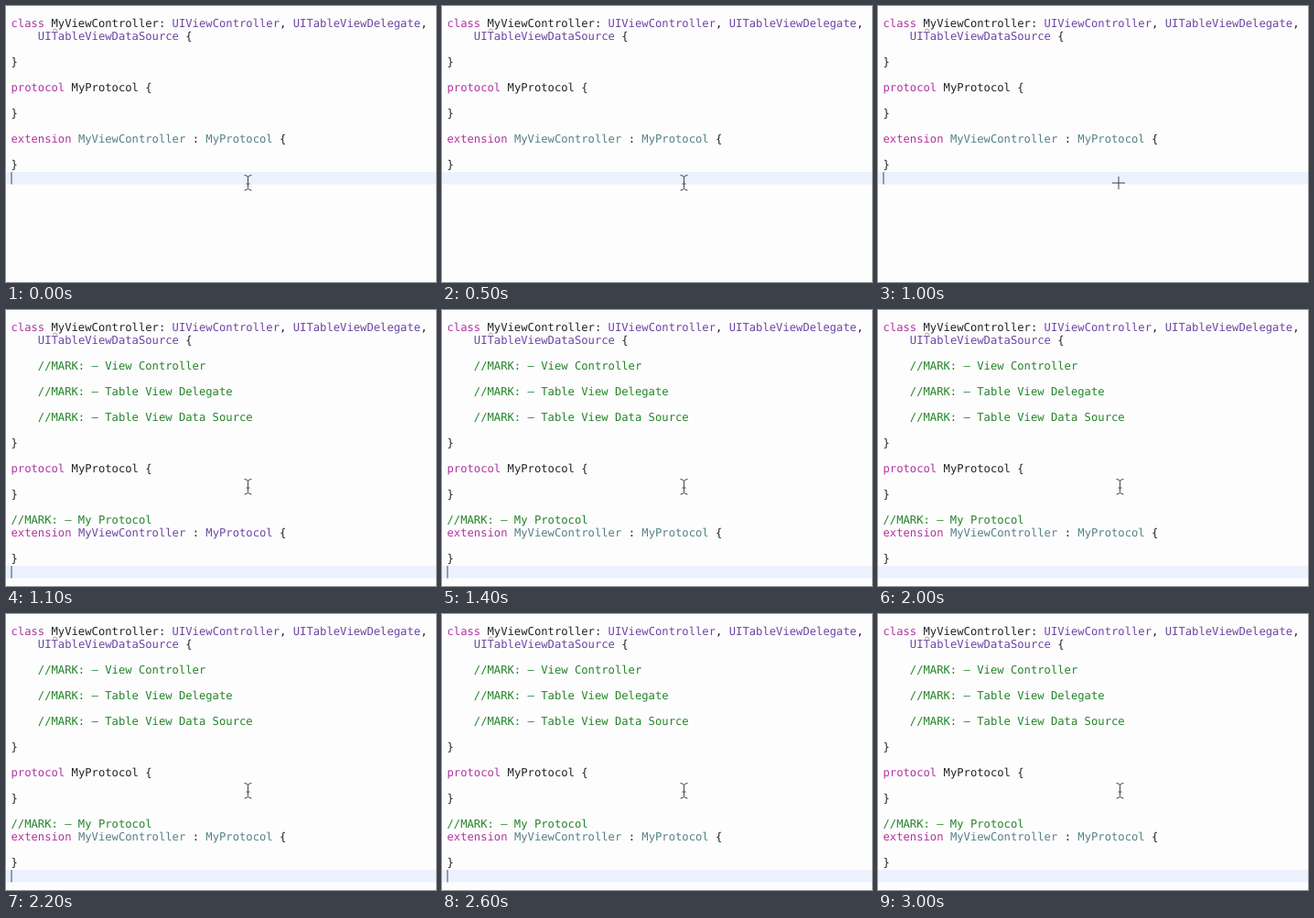
Write an HTML page that moves like this. It is 470 px wide and 301 px high and loops after 3100 ms.

```html
<!DOCTYPE html>
<html lang="en">
<head>
<meta charset="utf-8">
<style>
  html, body { margin: 0; width: 100%; height: 100%; overflow: hidden; background: #fefdfe; }
  svg { display: block; }
  text {
    font: 12.2px "DejaVu Sans Mono", monospace;
    white-space: pre;
    text-rendering: geometricPrecision;
    fill: #222;
  }
  .keyword { fill: #b0349f; }
  .type { fill: #6b46a2; }
  .comment { fill: #228428; }
  .own { fill: #528184; }
  .fresh .own { fill: #6b46a2; }
  .stroke { fill: none; stroke: #444; }
</style>
</head>
<body>
<svg width="470" height="301" viewBox="0 0 470 301">
  <rect id="line" width="470" height="13.5" fill="#ebf2fe"/>
  <g id="before"></g>
  <g id="after"></g>
  <path d="M51 27.2l2.5-2.4 2.5 2.4" fill="none" stroke="#cc7a62"/>
  <rect id="caret" x="5.5" width="1" height="13.5" fill="#444"/>
  <path id="beam" class="stroke"
    d="M260.5 184.5q3.5 0 4 2.5q.5-2.5 4-2.5M264.5 187v11.5M260.5 201q3.5 0 4-2.5q.5 2.5 4 2.5M262.5 194h4"/>
  <path id="cross" class="stroke" d="M256 193h14M263 186v14"/>
</svg>
<script>
const LOOP = 3100, LINE = 14, TOP = 13;
const $ = id => document.getElementById(id);
const span = (name, s) => `<tspan class="${name}">${s}</tspan>`;

const head = `class MyViewController: UIViewController, UITableViewDelegate,
    UITableViewDataSource {
`;
const protocol = `}

protocol MyProtocol {

}
`;
const extension = `extension MyViewController : MyProtocol {

}`;
const marks = ["View Controller", "Table View Delegate", "Table View Data Source"]
  .map(name => `    //MARK: – ${name}\n`).join("\n");

function highlight(line) {
  if (line.includes("//")) return span("comment", line);
  const extending = line.startsWith("extension");
  return line.replace(/\w+/g, word =>
    /^(class|protocol|extension)$/.test(word) ? span("keyword", word) :
    word.startsWith("UI") ? span("type", word) :
    extending ? span("own", word) : word);
}

function render(id, code) {
  $(id).innerHTML = code.split("\n").map((line, i) =>
    `<text x="5.5" y="${TOP + 10 + i * LINE}">${highlight(line)}</text>`).join("");
}

render("before", [head, protocol, extension].join("\n"));
render("after", [head, marks, protocol, "//MARK: – My Protocol\n" + extension]
  .join("\n"));

const show = (id, on) => $(id).style.display = on ? "" : "none";
const within = (t, from, to) => t >= from && t < to;

function draw(now) {
  const t = now % LOOP;
  const expanded = t >= 1100;
  const y = TOP + LINE * (expanded ? 19 : 12);
  const crosshair = within(t, 800, 1100);
  show("before", !expanded);
  show("after", expanded);
  show("cross", crosshair);
  show("beam", !crosshair);
  show("caret", t < 500 || within(t, 1000, 1700) || within(t, 2200, 2700));
  $("after").classList.toggle("fresh", t < 1400);
  $("line").setAttribute("y", y);
  $("caret").setAttribute("y", y);
  requestAnimationFrame(() => draw(performance.now()));
}
draw(0);
</script>
</body>
</html>
```
